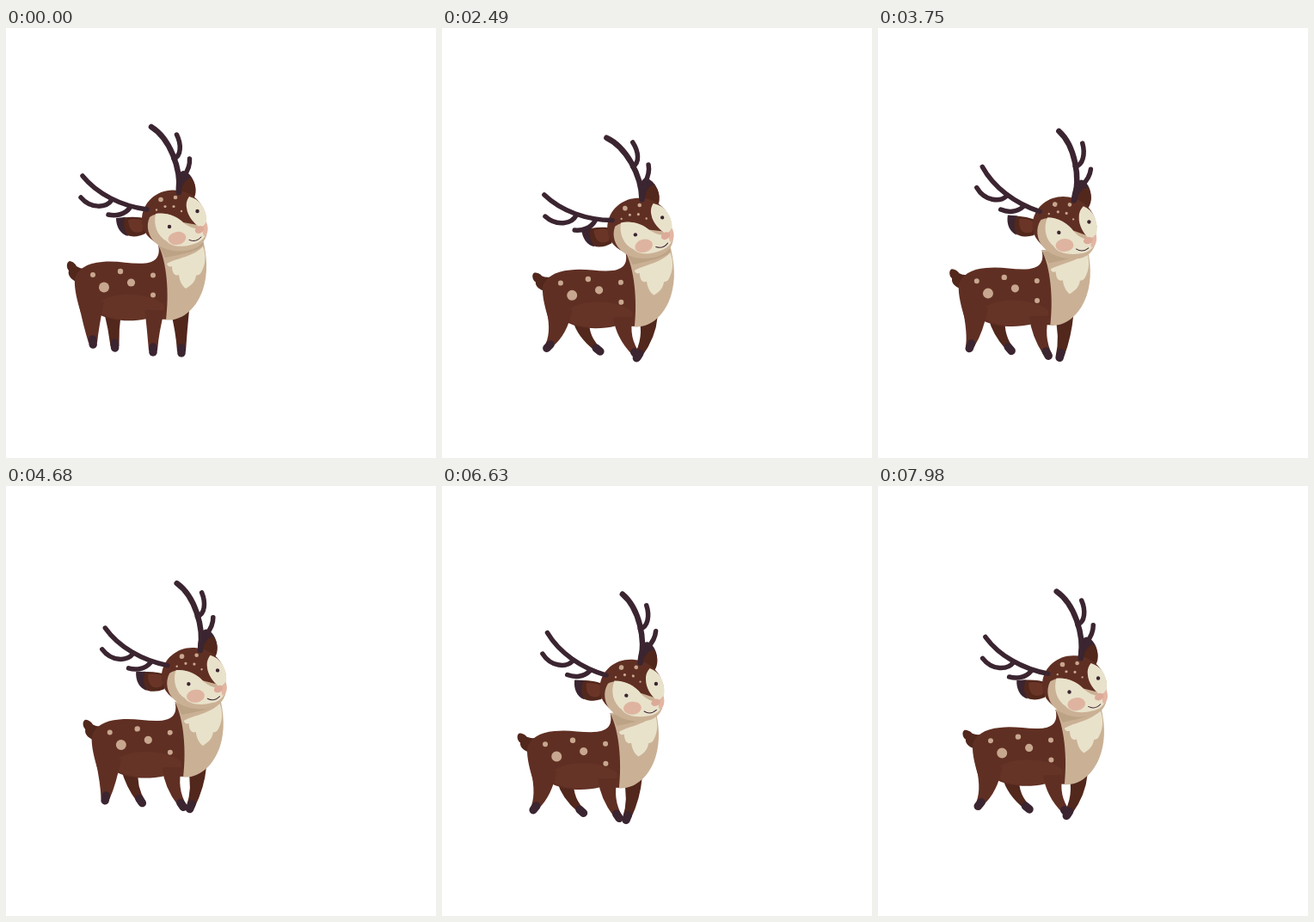
An HTML page for the animation above (8000 ms loop, 500 px wide and 500 px high).

```html
<!DOCTYPE html>
<html lang="en">
<head>
<meta charset="utf-8">
<title>Walking deer</title>
<style>
  html, body { margin: 0; width: 100%; height: 100%; overflow: hidden; background: #fff; }
  svg { display: block; width: 100%; height: 100%; }
  .coat { fill: #602f23; }
  .shade { fill: #52271c; }
  .dark { fill: #3b2530; }
  .cream { fill: #e9e2cb; }
  .tan { fill: #cab195; }
  .spots { fill: #c7a78f; }
  .line { fill: none; stroke: #3b2530; stroke-linecap: round; }
</style>
</head>
<body>
<svg viewBox="0 0 500 500">
  <g id="body">
    <g id="farLegs"></g>
    <path id="tail" class="shade" d="M86 297C77 294 71 288 73 282C70 279 70 272 74 271C79 272 81 275 82 277C85 279 88 280 92 280Z"/>
    <path class="coat" d="M177 252C180 266 174 272 162 273.500C145 275 130 270 112 272C94 273 83 281 80 291C79 303 83 318 87 331L108 333C123 341 146 342 164 338L190 339C200 310 195 270 182 252Z"/>
    <path fill="#653427" d="M108 320C120 306 166 306 184 322L184 336L164 337C145 341 122 339 111 332Z"/>
    <path class="tan" d="M177 252C187 272 190 308 186 339.500C206 341 222 325 229 304C235 286 234 266 229 246Z"/>
    <path class="cream" d="M187 274C200 267 218 266 229 254C233 264 232 276 227 284C225 288 222 287 221 288C220 296 214 300 209 303C204 299 202 294 201 287C196 289 193 284 193 277C190 278 188 277 187 274Z"/>
    <path fill="#bda386" d="M178 254L230 250C228 259 206 263 185 267Z"/>
    <g class="spots">
      <circle cx="101" cy="287" r="3"/>
      <circle cx="133" cy="283" r="3.200"/>
      <circle cx="145.500" cy="296" r="4.600"/>
      <circle cx="171" cy="287.500" r="3"/>
      <circle cx="171" cy="310.500" r="3"/>
      <circle cx="114" cy="301.500" r="6"/>
    </g>
    <g id="nearLegs"></g>
  </g>
  <g id="head">
    <path class="shade" d="M129 222C140 219 154 219 164 222L162 239C148 246 131 243 129 222Z"/>
    <path class="dark" d="M128 221L139 220C135 228 138 236 142 242C133 240 128 231 128 221Z"/>
    <path fill="#6a3527" d="M142 223C149 221 156 222 161 224L159 236C151 240 143 238 142 223Z"/>
    <path class="dark" d="M198 196C197 180 198 168 206 166C213 167 221 178 220 189L214 200Z"/>
    <path class="shade" d="M202 195C204 182 209 175 215 174C221 181 222 190 219 197L210 201Z"/>
    <path class="coat" d="M158 223C158 203 175 188.500 194 188.500C214 188.500 227 200 232 216C234 233 232 245 222 252C209 257 192 257 180 252C167 247 158 237 158 223Z"/>
    <path class="tan" d="M167 220C178 212 196 216 206 226L234 231C235 246 227 255 214 258C200 261 184 259 174 250C166 243 162 231 167 220Z"/>
    <path class="cream" d="M174 216C186 214 199 219 207 227C214 232 220 234 225 233L234 231C234 241 229 248 219 251C204 256 192 254 187 248C176 242 171 229 174 216Z"/>
    <path class="cream" d="M213 196C225 199 231 208 233 219C234 225 233 230 226 232C219 228 211 219 210 209C209 203 211 199 213 196Z"/>
    <ellipse cx="199" cy="244.500" rx="10.500" ry="7.500" fill="#dba995" opacity=".8" transform="rotate(-12 199 244.500)"/>
    <path fill="#e3b6a3" d="M233 226C236 233 235 240 230 242C228 238 228 230 233 226Z"/>
    <ellipse cx="225" cy="234.500" rx="5.500" ry="4" fill="#dcaa98" transform="rotate(-28 225 234.500)"/>
    <path class="line" d="M213 246.500Q221 250 227 243"/>
    <circle class="dark" cx="190" cy="231" r="2.200"/>
    <circle class="dark" cx="222.500" cy="213" r="2.200"/>
    <g class="spots">
      <circle cx="180" cy="199.500" r="2.800"/>
      <circle cx="197" cy="197" r="2.300"/>
      <circle cx="185" cy="207.500" r="1.600"/>
      <circle cx="195" cy="207.500" r="1.600"/>
      <circle cx="175" cy="211.500" r="1.200"/>
      <circle cx="204" cy="213" r="1.200"/>
    </g>
    <g id="antlers" class="line" stroke-width="5.500">
      <path stroke-width="6.500" d="M201 191C204 163 190 128 169 115"/>
      <path d="M195 152C204 149 204 135 198.500 124"/>
      <path d="M207 172C212 165 214 159 213.500 152"/>
      <path d="M89 172C106 193 134 207 164 211"/>
      <path d="M123 200C117 209 99 211 87 197"/>
      <path d="M144 209C138 217 128 219 119 217"/>
    </g>
  </g>
</svg>
<script>
const DURATION = 8000;
const $ = id => document.getElementById(id);
const clamp = v => Math.min(Math.max(v, 0), 1);
const mix = (a, b, s) => a.map((v, i) => v + (b[i] - v) * s);

function addPath(parent, className) {
  const path = document.createElementNS('http://www.w3.org/2000/svg', 'path');
  path.setAttribute('class', className);
  return $(parent).appendChild(path);
}

// A leg tapers from hip to foot; the foot travels between a standing and a stepping place.
function makeLeg(parent, tone, [hx, hy], hipWidth, [kx, ky], standing, stepping) {
  const limb = addPath(parent, tone);
  const hoof = addPath(parent, 'line');
  hoof.setAttribute('stroke-width', 9.5);
  const knee = hipWidth * .6;
  return step => {
    const [fx, fy] = mix(standing, stepping, step);
    limb.setAttribute('d', `M${hx - hipWidth} ${hy}Q${kx - knee} ${ky} ${fx - 5} ${fy}
      L${fx + 5} ${fy}Q${kx + knee} ${ky} ${hx + hipWidth} ${hy}Z`);
    const length = Math.hypot(fx - kx, fy - ky);
    const ux = (fx - kx) / length, uy = (fy - ky) / length;
    hoof.setAttribute('d', `M${fx - ux * 4} ${fy - uy * 4}l${ux * 6} ${uy * 6}`);
  };
}

const farHind = makeLeg('farLegs', 'shade', [124, 330], 10, [125, 350], [126.5, 370], [144, 366]);
const farFront = makeLeg('farLegs', 'shade', [202, 328], 11, [204, 352], [204, 376], [189, 374]);
const nearHind = makeLeg('nearLegs', 'coat', [99, 318], 15, [99, 347], [101, 366], [85, 361]);
const nearFront = makeLeg('nearLegs', 'coat', [173, 328], 11.5, [171, 352], [171, 375], [188, 372]);

// Swings with a cosine ease from one turning point [time, value] to the next.
const swing = (...turns) => time => {
  const next = turns.findIndex(([t]) => t > time);
  if (next < 0) return turns.at(-1)[1];
  const [t0, from] = turns[next - 1], [t1, to] = turns[next];
  return from + (to - from) * (1 - Math.cos(Math.PI * (time - t0) / (t1 - t0))) / 2;
};

const travel = swing([0, 0], [1260, -4], [2470, 37.2], [4030, 12], [5350, 28],
  [6150, 11], [7130, 28], [7400, 20], [7980, 30.2]);
const bob = swing([0, 0], [1200, .6], [3000, 11], [4900, -1], [5640, 4.2],
  [6150, -5], [6630, 12.8], [7300, -5], [7980, 8.7]);
const nod = swing([0, 0], [2000, -6.5], [3750, 9.6], [5640, -2.2], [6300, 8], [7980, 3.5]);

const place = (id, transform) => $(id).setAttribute('transform', transform);

function draw(time) {
  const x = travel(time), y = bob(time), angle = nod(time);
  // The further the body leans ahead or sinks, the wider the stride.
  const front = clamp(x / 30);
  const hind = clamp((x + 2 * y) / 52);
  const move = `translate(${x} ${y})`;

  place('body', `${move} rotate(${-hind} 130 300)`);
  place('tail', `rotate(${-12 * hind} 88 289)`);
  place('head', `${move} rotate(${angle} 194 269)`);
  place('antlers', `rotate(${(angle - 5) * front * .4} 190 205)`);
  nearHind(hind);
  farHind(Math.sqrt(hind));
  nearFront(Math.sqrt(front));
  farFront(front);
}

const start = performance.now();
function tick() {
  draw((performance.now() - start) % DURATION);
  requestAnimationFrame(tick);
}
tick();
</script>
</body>
</html>
```
